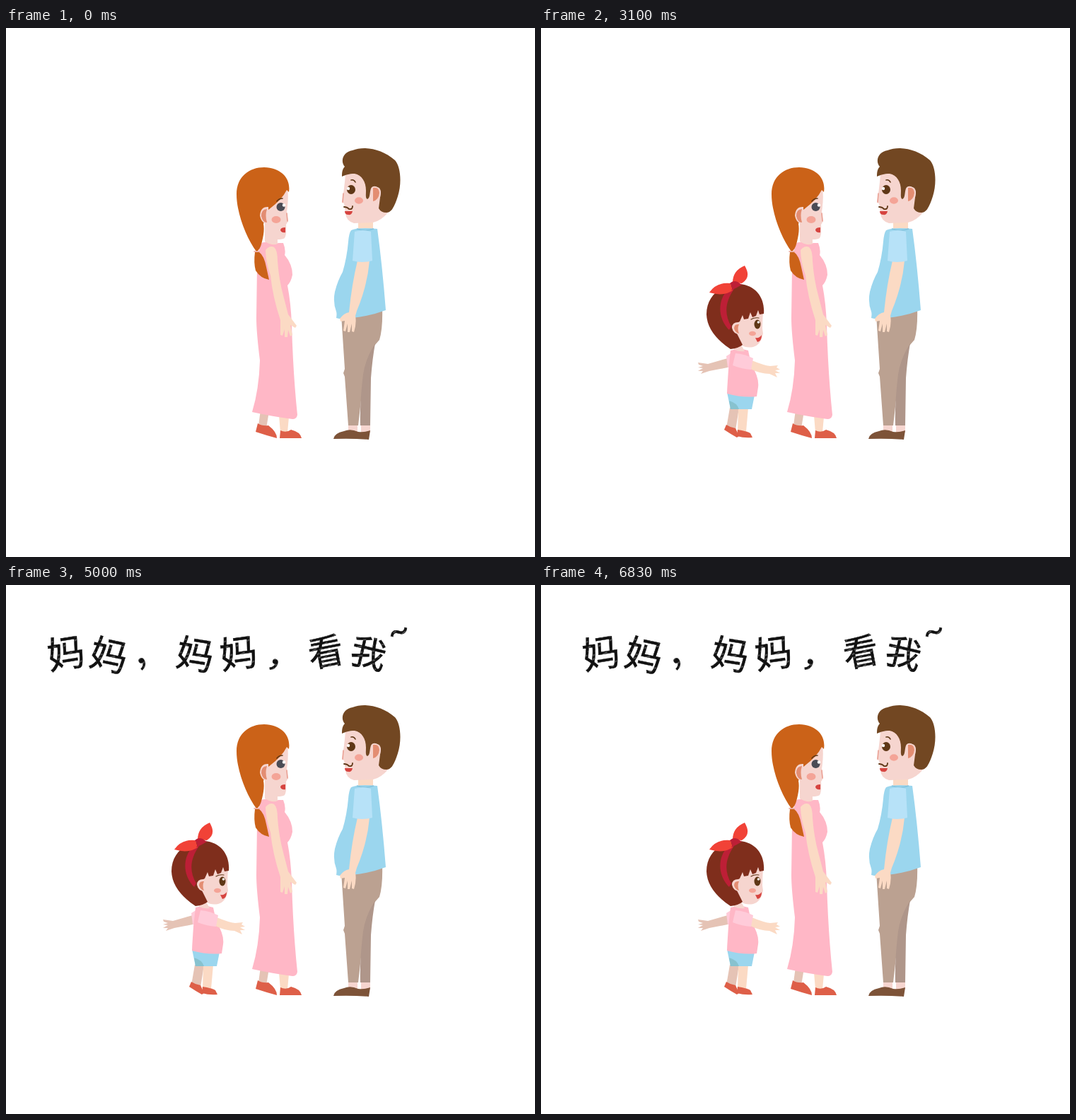
Animation of 748x748 px, one loop 7.83 s. Source, as an HTML page:

```html
<!DOCTYPE html>
<html lang="zh-CN">
<head>
<meta charset="utf-8">
<title>妈妈，看我</title>
<style>
html, body { margin: 0; width: 100%; height: 100%; overflow: hidden; background: #fff; }
svg { display: block; width: 100%; height: 100%; }
text { font-family: "Noto Sans CJK SC", "Noto Sans CJK", sans-serif; fill: url(#ink); stroke: #111; stroke-width: .5px; }
.face { fill: #f6d5cf } .skin { fill: #fbdac4 } .dim { fill: #e5c3b5 }
.pink { fill: #ffb7c6 } .pale { fill: #ffcbd9 } .blue { fill: #9bd6ee } .teal { fill: #87c2cf }
.red { fill: #de5f48 } .lip { fill: #d64440 } .ear { fill: #e38d72 } .blush { fill: #f4a497 }
.ginger { fill: #cb6218 } .brown { fill: #724722 } .maroon { fill: #7f2e1c }
.bow { fill: #f14237 } .band { fill: #bd1f36 } .white { fill: #fff } .slate { fill: #4b4c55 } .iris { fill: #5f3716 }
.line { fill: none; stroke: #5f3716; stroke-width: 1.6; stroke-linecap: round }
.nose { fill: none; stroke: #eaa094; stroke-width: 1.6; stroke-linecap: round }
</style>
</head>
<body>
<svg viewBox="0 0 748 748" xmlns="http://www.w3.org/2000/svg">
<defs>
  <pattern id="ink" width="17" height="13" patternUnits="userSpaceOnUse" patternTransform="rotate(-18)">
    <path fill="#111" d="M0 0H17V13H0Z"/>
    <path stroke="#999" stroke-width=".9" d="M1 3H8M10 7H15M4 11H8"/>
  </pattern>

  <g id="girlHead">
    <path class="face" d="M277 412Q297 396 314 402Q313 416 313 425L314 432Q311 448 300 451Q290 453 283 448L288 457Q281 458 273 455L272 440Z"/>
    <path class="maroon" d="M234 405C234 376 258 362 281 362C304 364 317 382 315 404L309 405 307 399 304 407 299 409 296 402 293 411 287 412 285 406 281 415Q273 418 277 432L285 448Q279 453 268 454Q235 432 234 405Z"/>
    <path class="band" d="M264 370C249 386 250 411 266 427L269 422C259 405 260 388 273 369Z"/>
    <path class="bow" d="M238 374Q248 359 268 361L271 371Q258 380 238 374ZM271 360Q271 343 288 336Q298 353 284 361Z"/>
    <path class="band" d="M267 361Q272 356 278 359L284 363 277 367 269 371Q272 367 267 361Z"/>
    <path class="face" d="M279 416Q270 416 270 424Q272 433 281 433Z"/>
    <path class="ear" d="M280 419Q273 418 273 425Q275 431 280 432Q277 425 280 419Z"/>
    <g id="girlEye"><ellipse class="iris" cx="306" cy="419" rx="4.5" ry="6.5"/><circle class="white" cx="307.5" cy="416" r="1.8"/></g>
    <path class="line" style="stroke-width:1.2" d="M297 412Q302 409 308 410"/>
    <ellipse class="blush" cx="299" cy="432" rx="5" ry="3.2"/>
    <path class="lip" d="M303 438Q309 439 312 434Q312 443 306 444Z"/>
  </g>

  <g id="girlLegs">
    <path class="dim" d="M267 537H280L275 569 262 566Z"/>
    <path class="red" d="M262 561Q268 565 275 566L280 577 277 579Q268 574 259 568Z"/>
    <path class="skin" d="M279 537H293L290 571H278Z"/>
    <path class="red" d="M278 568Q291 570 296 573L299 579Q287 580 277 577Z"/>
  </g>

  <g id="back">
    <path class="dim" d="M251 463Q235 474 223 479L215 486 219 488 216 492 222 490 221 494 230 489Q245 482 257 475Z"/>
    <path class="pale" d="M270 447L250 462 257 476 270 470Z"/>
    <path class="dim" d="M271 528H285L278 557H270Z"/>
    <path class="skin" d="M286 528H300L296 560H286Z"/>
    <path class="red" d="M267 556Q273 554 277 557Q278 566 276 572Q270 574 267 565ZM286 559L296 558Q299 570 295 576Q286 576 286 559Z"/>
    <path class="blue" d="M265 506Q285 512 306 511L303 530H271Z"/>
    <path class="teal" d="M265 506Q269 520 281 530H271Z"/>
    <path class="pink" d="M270 446Q285 442 299 445L304 460Q308 484 309 511Q285 515 264 507Q269 480 270 446Z"/>
    <path class="skin" d="M321 460Q335 465 345 466L354 469 349 471 354 474 349 474 352 479 342 476Q330 476 319 470Z"/>
    <path class="pale" d="M298 450L324 457 320 472 294 465Z"/>
    <path class="face" d="M299 395L309 389Q315 398 314 415Q314 428 309 432L299 420Z"/>
    <path class="maroon" d="M233 395C232 372 255 357 280 357C304 354 315 375 315 394L312 398 308 390Q299 396 299 407Q302 420 311 430Q300 444 266 445Q234 422 233 395Z"/>
    <path class="face" d="M306 397Q297 399 299 409Q303 416 309 415Z"/>
    <path class="ear" d="M306 400Q299 402 301 408Q304 413 308 411Z"/>
    <path class="band" d="M274 357L286 357Q297 372 299 400L296 404Q292 372 274 357Z"/>
    <path class="bow" d="M245 340Q258 335 271 348L270 356Q258 362 248 356ZM275 348Q290 337 306 341Q305 353 296 356Q285 358 275 355Z"/>
    <ellipse class="band" cx="273" cy="353" rx="5" ry="5.5"/>
  </g>
</defs>

<g id="girl">
  <g id="walk">
    <path class="dim" d="M194 517L187 521 190 523 188 530 193 528Z"/>
    <g id="stride">
      <path class="dim" d="M194 545H208L200 570 189 567Z"/>
      <path class="red" d="M188 566Q198 569 205 573L206 580Q195 576 185 573Z"/>
      <path class="skin" d="M211 545H224L237 567 227 573Z"/>
      <path class="red" d="M222 572Q233 569 240 566L245 571Q235 576 224 579Z"/>
    </g>
    <use id="stand" href="#girlLegs" x="-71"/>
    <path class="blue" d="M192 518Q212 521 230 520Q229 535 223 547H193Q189 530 192 518Z"/>
    <path class="teal" d="M210 547Q215 534 228 532L223 547Z"/>
    <path class="pink" d="M200 463Q212 459 222 465L229 490Q232 505 231 521Q210 521 192 518Q196 490 200 463Z"/>
    <path class="skin" d="M213 495L226 489 236 513 241 519 239 521 240 528 237 526 236 531 233 527 231 531 228 526Q226 512 213 495Z"/>
    <path class="pale" d="M202 471Q212 465 219 468L228 490 212 497Z"/>
    <use href="#girlHead" transform="translate(205 432) rotate(8) translate(-276 -424)"/>
  </g>

  <g id="right">
    <path class="dim" d="M264 467L236 475 222 473 223 476 229 478 222 480 229 481 222 485 229 485 226 489 238 485 264 480Z"/>
    <path class="pale" d="M270 459L262 464 264 480 270 480Z"/>
    <use href="#girlLegs"/>
    <path class="blue" d="M263 515Q285 522 302 519L298 539H268Z"/>
    <path class="teal" d="M266 527Q277 530 280 539H268Z"/>
    <path class="pink" d="M268 456Q281 452 293 456L297 475Q309 495 307 508L305 521Q285 523 263 517Q264 485 268 456Z"/>
    <path class="skin" d="M298 470Q315 477 324 478L335 477 333 480 338 483 331 484 338 488 331 488 334 494 323 489Q310 489 296 482Z"/>
    <path class="pale" d="M275 460Q288 461 300 467L297 483Q283 482 271 477Z"/>
    <use href="#girlHead"/>
  </g>

  <g id="left">
    <path class="dim" d="M301 458L312 452 319 443 320 448 326 445 322 450 327 452 321 454 323 459 316 459 302 468Z"/>
    <path class="pale" d="M290 450L304 457 301 468 294 467Z"/>
    <path class="red" d="M290 550L296 556 290 564 286 560Z"/>
    <path class="skin" d="M277 530L292 528 290 561Q284 564 278 562Z"/>
    <path class="red" d="M273 576Q273 564 284 563L292 560Q295 565 287 569Q280 575 273 576Z"/>
    <path class="blue" d="M263 513L303 504Q303 515 296 522L295 530 276 534Z"/>
    <path class="pink" d="M266 452Q278 445 291 447Q298 470 304 503Q285 513 263 515Q257 500 268 470Z"/>
    <path class="skin" d="M263 457Q250 457 240 454L229 447 230 452 220 451 228 455 220 457 229 459 227 465 236 463Q250 469 263 468Z"/>
    <path class="pale" d="M261 456Q275 450 287 451L288 467Q275 470 263 468Z"/>
    <use href="#girlHead" transform="translate(280 417) rotate(-12) scale(-1 1) translate(-276 -424)"/>
  </g>
  <use id="backRight" href="#back"/>
  <use id="backLeft" href="#back" transform="translate(562) scale(-1 1)"/>
</g>

<g id="mother">
  <path class="dim" d="M360 540L372 542 368 566 357 562Z"/>
  <path class="red" d="M356 559Q362 563 371 562Q383 571 383 580Q368 576 353 571Z"/>
  <path class="skin" d="M386 548L400 550 398 572H388Z"/>
  <path class="red" d="M388 569Q396 573 403 568Q416 571 418 580H387Z"/>
  <path class="ginger momTurn" d="M354 301Q344 315 344 332Q346 348 357 352V304Z"/>
  <path class="skin" d="M367 290H384V308Q375 314 367 306Z"/>
  <path class="pink" d="M359 306Q363 302 368 303Q378 309 385 304L392 304Q396 314 394 321Q405 334 405 349Q403 359 398 364Q403 390 404 420Q406 490 412 547Q411 553 405 553Q375 549 348 543Q358 510 359 470Q354 430 354 410L355 340Z"/>
  <path id="armOut" class="skin" d="M367 314Q373 307 379 310Q384 314 384 330Q386 356 392 378L399 405 411 421 409 424 402 420 405 434 402 436 399 427 398 437 394 437 394 426 391 435 388 434V413Q377 380 374 350Q367 330 367 314Z"/>
  <path id="armDown" class="skin" d="M368 314Q373 306 381 311Q385 320 384 350L385 406 391 424 390 427 385 422 384 437 381 438 380 428 378 439 375 439 375 428 372 437 370 436Q371 416 374 405Q368 370 368 314Z"/>
  <g class="momSide">
    <path class="face" d="M366 254Q388 243 398 227Q400 240 397 260L399 273 396 278Q397 292 394 297Q391 299 384 299V305Q375 307 366 302Z"/>
    <path class="ginger" d="M326 235C326 210 344 197 365 197C389 198 403 212 400 232L397 229Q390 243 371 257L364 277Q366 286 362 302Q359 315 354 316C340 297 326 262 326 235Z"/>
    <path class="ginger" d="M352 317H358Q365 322 368 338L372 356Q360 354 353 343Q350 332 352 317Z"/>
    <path class="nose" d="M351 316H358M397 262L398 273"/>
    <path class="face" d="M371 253Q360 252 359 265Q361 277 371 277Z"/>
    <path class="ear" d="M369 256Q361 256 361 266Q363 275 369 275Q366 265 369 256Z"/>
    <g data-cy="253"><circle class="slate" cx="388.5" cy="253" r="6"/><circle class="white" cx="393" cy="250.5" r="2.2"/></g>
    <path class="line" d="M383 245Q386 241 391 241"/>
    <ellipse class="blush" cx="382" cy="271" rx="6.5" ry="5"/>
    <path class="lip" d="M395 282Q388 282 388 286Q390 290 395 289Z"/>
  </g>
  <g class="momTurn">
    <path class="ginger" d="M333 240C333 205 352 187 375 187C403 186 418 206 418 224Q417 238 414 246L370 260 367 296Q358 304 350 303Q350 290 344 276Q333 260 333 240Z"/>
    <path class="face" d="M355 232Q375 245 414 245Q413 276 404 288Q397 298 384 300V304Q370 305 366 297Q368 294 363 288Q355 265 355 232Z"/>
    <path class="face" d="M345 248Q336 247 337 258Q341 271 352 277L357 275Z"/>
    <path class="ear" d="M344 250Q338 250 340 259Q343 266 349 269Q345 259 344 250Z"/>
    <circle class="slate" cx="373" cy="256" r="5.5"/><circle class="white" cx="369" cy="257" r="2"/>
    <circle class="slate" cx="402" cy="251" r="5.3"/><circle class="white" cx="406" cy="252" r="1.8"/>
    <path class="line" d="M365 244Q368 241 371 242"/>
    <path class="nose" d="M392 263L395 272 391 274"/>
    <ellipse class="blush" cx="373" cy="275" rx="6" ry="3.5"/><ellipse class="blush" cx="407" cy="267" rx="5" ry="3.7"/>
    <path class="lip" d="M384 286L397 284Q397 294 390 294Q384 293 384 286Z"/>
  </g>
</g>

<g id="father">
  <path class="face" d="M484 560H497V572H484ZM502 560H515V572H502Z"/>
  <path class="brown" style="fill:#7d5338" d="M463 581Q464 573 478 570Q487 566 498 571Q507 572 515 569L513 582Q490 580 463 581Z"/>
  <path fill="#bba191" d="M474 405L532 395Q533 425 528 441L521 449 505 500 498 562H484L479 493 477 488 479 482Z"/>
  <path fill="#af968a" d="M522 446Q508 468 505 490Q500 530 501 562H515L516 495Q518 468 522 446Z"/>
  <path class="skin" d="M498 268H519V286H498Z"/>
  <path class="blue" d="M488 286Q498 281 525 284Q532 335 537 399Q508 410 471 411L467 410Q468 404 467 401Q462 388 465 373Q469 357 476 345Q482 325 484 302Q485 290 488 286Z"/>
  <path fill="none" stroke="#82c2dd" stroke-width="1.4" d="M496 284Q508 288 520 284"/>
  <path class="skin" d="M497 329H514Q511 364 496 400L494 407Q496 417 492 430L489 429 489 418 486 430 483 430 483 418 480 429 477 428 479 414 473 415 472 411Q478 403 485 402Q489 362 497 329Z"/>
  <path fill="#b7e2f8" d="M493 288Q505 284 516 288L518 329Q503 333 490 329Z"/>
  <g class="dadSide">
    <path class="face" d="M480 207L508 204 530 225 541 260Q530 273 519 275L492 276Q481 273 480 262L478 248 475 247Q478 230 480 207Z"/>
    <path class="nose" d="M477 234L476 246"/>
    <path class="brown" d="M475 210C475 203 476 199 479 196C472 188 477 175 490 173C507 166 532 171 550 187C558 196 560 219 554 238C550 250 546 261 538 261Q530 261 527 255L530 232C528 224 519 221 516 227C514 233 515 240 511 242C508 241 509 236 509 230C509 217 503 208 493 206C485 206 480 208 475 210Z"/>
    <path class="face" d="M518 226Q529 222 530 232Q530 246 518 248Z"/>
    <path class="ear" d="M519 226Q527 224 528 233Q527 243 519 245Z"/>
    <g data-cy="228.5"><ellipse class="iris" cx="488" cy="228.5" rx="6" ry="6.5"/><circle class="white" cx="484" cy="227" r="2.2"/></g>
    <path class="line" d="M488 215Q492 214 494 218"/>
    <ellipse class="blush" cx="499" cy="244" rx="6" ry="4.7"/>
    <path class="lip" d="M479 259H490Q489 265 484 264Q479 264 479 259Z"/>
    <path class="line" style="stroke-width:1.8" d="M478 253Q482 253 485 256Q490 257 490 252"/>
  </g>
  <g class="dadTurn">
    <path class="face" d="M467 220Q470 200 482 200Q498 208 527 218L530 242Q542 231 544 239Q543 252 533 253Q530 268 519 276L498 278Q470 270 467 220Z"/>
    <path class="brown" d="M466 190C465 181 476 178 488 178C510 172 538 176 546 185C553 200 549 226 544 235Q532 237 529 249L526 247Q528 232 526 222C518 208 507 211 495 208C482 195 471 205 469 222L466 224Q464 205 473 197Q466 196 466 190Z"/>
    <path class="ear" d="M542 237Q534 239 533 250Q542 250 542 237Z"/>
    <ellipse class="iris" cx="472" cy="232" rx="5" ry="6.8"/><circle class="white" cx="469.5" cy="234" r="1.8"/>
    <ellipse class="iris" cx="502" cy="238.5" rx="6" ry="7.5"/><circle class="white" cx="499" cy="240.5" r="2.2"/>
    <path class="line" d="M469 217L473 215M505 221Q509 221 511 224"/>
    <path class="nose" d="M484 240L482 250 487 251"/>
    <ellipse class="blush" cx="471" cy="246" rx="4.5" ry="3"/><ellipse class="blush" cx="509" cy="256" rx="7" ry="4.5"/>
    <path class="lip" d="M480 263H491Q491 272 485 272Q480 270 480 263Z"/>
    <path class="line" style="stroke-width:3" d="M475 260Q480 257 485 261Q494 268 499 263Q500 260 497 259"/>
  </g>
</g>
<g id="words"></g>
</svg>

<script>
const $ = id => document.getElementById(id);
const show = (el, on) => el.style.display = on ? "" : "none";
const showAll = (cls, on) => document.querySelectorAll("." + cls).forEach(el => show(el, on));
const squash = (el, cy, s) => el.setAttribute("transform", `translate(0 ${cy * (1 - s)}) scale(1 ${s})`);
const LOOP = 7830;

// character, centre x and y at rest, then shift and tilt when swaying
const glyphs = [
  ["妈", 83, 98, 2, -2, -9], ["妈", 144, 98, 2, 1, 12], ["，", 190, 115, 2, 0, -24],
  ["妈", 266, 98, 2, 0, 9], ["妈", 327, 98, 2, -2, -8], ["，", 373, 115, 3, 0, 16],
  ["看", 448, 96, 4, -2, -11], ["我", 512, 96, 1, 0, 13], ["~", 556, 69, 1, -1, -22]
];
// font size and offset of the pen from the glyph's centre
const pens = { "妈": [53, -27, 20], "看": [50, -25, 19], "我": [50, -25, 19], "，": [48, -9, 0], "~": [54, -16, 18] };
const letters = glyphs.map(([ch]) => {
  const el = document.createElementNS("http://www.w3.org/2000/svg", "text");
  const [size, x, y] = pens[ch];
  el.setAttribute("font-size", size);
  el.setAttribute("x", x);
  el.setAttribute("y", y);
  el.textContent = ch;
  $("words").append(el);
  return el;
});

function drawWords(sway) {
  glyphs.forEach(([, x, y, dx, dy, a], i) => letters[i].setAttribute("transform",
    sway ? `translate(${x + dx} ${y + dy}) rotate(${a})` : `translate(${x} ${y})`));
}

// step of the twirl, nine steps per turn
function spinStep(t) {
  const from = (start, first, last) => Math.min(last, first + Math.floor((t - start) / 200));
  return t < 3800 ? from(3100, 0, 2) : t < 5630 ? from(3800, 3, 11) : from(5630, 12, 18);
}

const poses = ["walk", "right", "left", "backRight", "backLeft"];
const turn = ["right", "right", "backRight", "backRight", "backLeft", "backLeft", "left", "left", "right"];
// the second turn passes the same poses, facing right again at its end
const walkX = [-114, -83, -41, 0, 30, 52, 66];
const lids = [.55, .12, .55];

function draw(t) {
  const n = spinStep(t);
  const k = Math.floor((t - 1500) / 200);
  const phase = n >= 0 ? n % 9 : 0;
  const pose = t < 1500 ? "" : k < 7 ? "walk" : n < 0 ? "right" : turn[phase];
  poses.forEach(p => show($(p), p === pose));
  if (pose === "walk") {
    $("walk").setAttribute("transform", `translate(${walkX[k]})`);
    show($("stride"), k % 2);
    show($("stand"), k % 2 === 0);
  }
  squash($("girlEye"), 419, k === 3 || k === 7 ? .12 : 1);

  const blink = t < 2000 ? Math.floor((t - 700) / 200) : Math.floor((t - 2300) / 200);
  document.querySelectorAll("[data-cy]").forEach(el => squash(el, +el.dataset.cy, lids[blink] || 1));

  const look = phase >= 2 && phase <= 5;
  const down = phase >= 2 && phase <= 7;
  showAll("momSide", !look);
  showAll("momTurn", look);
  showAll("dadSide", !look);
  showAll("dadTurn", look);
  show($("armOut"), !down);
  show($("armDown"), down);

  show($("words"), n >= 1);
  drawWords(n % 2 === 1 || n === 18);
}

const begin = performance.now();
function tick() {
  draw((performance.now() - begin) % LOOP);
  requestAnimationFrame(tick);
}
tick();
</script>
</body>
</html>
```
